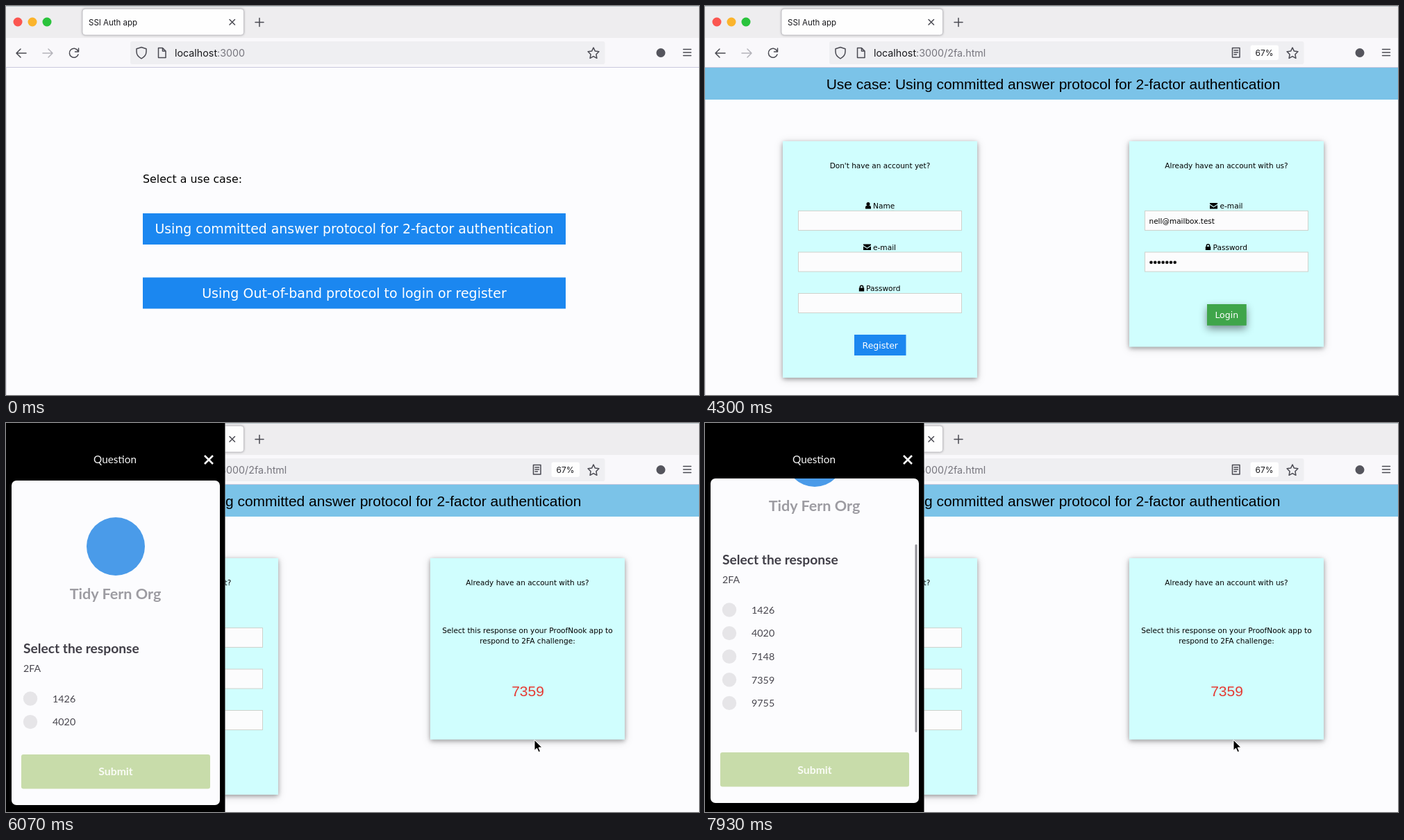
These frames come from a looping animation (998x561 px, 8000 ms). An HTML page:

```html
<!DOCTYPE html>
<html lang="en">
<head>
<meta charset="utf-8">
<style>
html, body { margin: 0; width: 100%; height: 100%; overflow: hidden; background: #fcfcfe; }
svg { display: block; }
text { white-space: pre; }
.ui { font-family: Inter, sans-serif; }
.web { font-family: "DejaVu Sans", sans-serif; }
.head { font-family: "Liberation Sans", sans-serif; }
.app { font-family: Lato, sans-serif; }
.line { fill: none; stroke: #4a4a52; stroke-width: 1.5; stroke-linecap: round; stroke-linejoin: round; }
.card { fill: #d0fefe; filter: drop-shadow(0 2px 3px rgba(0,0,0,.3)) drop-shadow(0 2px 6px rgba(0,0,0,.16)); }
.lift { filter: drop-shadow(0 5px 6px rgba(0,0,0,.45)); }
</style>
</head>
<body>
<svg id="stage" width="998" height="561" viewBox="0 0 998 561"></svg>
<script>
const text = (cls, x, y, size, str, attrs = "") =>
  `<text class="${cls}" x="${x}" y="${y}" font-size="${size}" ${attrs}>${str}</text>`;
const mid = (cls, x, y, size, str, attrs = "") => text(cls, x, y, size, str, `text-anchor="middle" ${attrs}`);
const rect = (x, y, w, h, fill, attrs = "") =>
  `<rect x="${x}" y="${y}" width="${w}" height="${h}" fill="${fill}" ${attrs}/>`;
const circle = (x, y, r, fill, attrs = "") => `<circle cx="${x}" cy="${y}" r="${r}" fill="${fill}" ${attrs}/>`;
const path = (d, attrs = 'class="line"') => `<path d="${d}" ${attrs}/>`;
const group = (id, body, attrs = "") => `<g id="${id}" ${attrs}>${body}</g>`;

const BLUE = "#1b87f0", GREEN = "#3fa54a", PAPER = "#fcfcfd";

const icons = {
  user: "M-4 4.5V2Q-4 0-2 0H2Q4 0 4 2V4.5ZM0-5a2.6 2.6 0 1 1-.01 0Z",
  mail: "M-5.5-4h11v1.6L0 1.2-5.5-2.4ZM-5.5-1 0 2.6 5.5-1V4.5h-11Z",
  lock: "M-3.7-.4h.8v-1.2a2.9 2.9 0 0 1 5.8 0v1.2h.8v4.8h-7.4ZM-1.4-.4h2.8v-1.2a1.4 1.4 0 0 0-2.8 0Z"
};
const label = (x, y, icon, tx, str) =>
  path(icons[icon], `transform="translate(${x} ${y})" fill-rule="evenodd"`) + text("web", tx, y + 4, 10.6, str);
const field = (x, y) => rect(x + .5, y + .5, 235, 28, PAPER, 'stroke="#cfd2cc"');
const ring = (id, y) => rect(633, y, 236.5, 29, "none", `id="${id}" stroke="#2c7be0" stroke-width="1.6" rx="1"`);
const button = (x, y, w, h, fill, size, str) =>
  rect(x, y, w, h, fill) + mid("web", x + w / 2, y + h / 2 + size * .36, size, str, 'fill="#fff"');

const browser =
  rect(0, 0, 998, 561, "#fcfcfe") + rect(0, 0, 998, 46, "#eeedef") + rect(0, 0, 998, 1, "#b9c4c9") +
  rect(0, 46, 998, 42, "#f9f8fb") + rect(0, 88, 998, 1, "#c9c8de") + rect(0, 89, 1, 472, "#dedde6") +
  circle(17, 23, 6.5, "#fb5650") + circle(38, 23, 6.5, "#fbb42c") + circle(59, 23, 6.5, "#2ac33c") +
  rect(110, 4, 232.5, 38, "#fefefe", 'rx="4" stroke="#c4c3c8" style="filter:drop-shadow(0 0 1.5px rgba(0,0,0,.25))"') +
  text("ui", 119, 28, 11.5, "SSI Auth app", 'fill="#18181c"') +
  path("M322 19.5l7.5 7.5M329.500 19.500l-7.500 7.500") + path("M359 23.500h12M365 17.500v12") +
  path("M29 68H15.500M21 62l-6 6 6 6") +
  path("M53 68h13.500M61 62l6 6-6 6", 'class="line" style="stroke:#b4b3ba"') +
  path("M103.500 64.500A6.500 6.500 0 1 0 104 70M104.500 61v5h-5") +
  rect(179, 51, 683.5, 33, "#efeff2", 'rx="3"') +
  path("M195 59.500l7 2.300v4q0 6.500-7 10-7-3.500-7-10v-4Z") +
  path("M219.500 60.500h6l4.500 4.500v9.500h-10.500ZM225.500 60.500v4.500h4.500") +
  path("M846 60l2.400 5.100 5.500.7-4 3.900 1 5.600-4.900-2.700-4.900 2.700 1-5.600-4-3.900 5.500-.7Z") +
  circle(943, 67.5, 6.5, "#55555d") +
  path("M975.500 62.500h11M975.500 67h11M975.500 71.500h11") +
  `<text class="ui" x="243" y="73" font-size="14.3" fill="#18181c">localhost<tspan fill="#77767e">:3000<tspan id="route">/2fa.html</tspan></tspan></text>` +
  group("extras",
    path("M759.500 60.500h10.500v13.500h-10.500ZM762 64h5.500M762 67h5.500M762 70h3.500") +
    rect(785.500, 56.500, 40.500, 21.500, "#fefefe", 'rx="3"') + mid("ui", 805.500, 72, 12, "67%", 'fill="#18181c"'));

const chooser = group("chooser",
  text("web", 197, 254.500, 15.800, "Select a use case:") +
  rect(197, 299, 609, 45, BLUE, 'id="hover" class="lift"') +
  button(197, 299, 609, 45, BLUE, 18.900, "Using committed answer protocol for 2-factor authentication") +
  button(197, 391.500, 609, 45, BLUE, 19, "Using Out-of-band protocol to login or register"));

const forms = group("forms",
  rect(0, 89, 998, 46, "#7bc3e8") +
  mid("head", 501.500, 119.500, 21, "Use case: Using committed answer protocol for 2-factor authentication") +
  rect(112, 195, 280, 341, "", 'class="card"') +
  mid("web", 252, 234, 10.500, "Don't have an account yet?") +
  label(235, 288, "user", 242, "Name") + field(134, 295) +
  label(233.500, 347.500, "mail", 242, "e-mail") + field(134, 354.500) +
  label(225.500, 407, "lock", 232, "Password") + field(134, 414) +
  button(215, 474, 74.500, 30, BLUE, 12.500, "Register") +
  group("login",
    rect(611, 195, 280, 296.500, "", 'class="card"') +
    label(732.500, 288, "mail", 741.500, "e-mail") + field(633, 295) + ring("mailRing", 295) +
    text("web", 639.500, 313.500, 10.500, "nell@mailbox.test", 'id="mail"') +
    label(724.500, 347.500, "lock", 731.500, "Password") + field(633, 354.500) + ring("passRing", 354.500) +
    group("dots", [...Array(7).keys()].map(i => circle(642.500 + i * 5.700, 369.700, 2.300, "#111")).join("")) +
    rect(723, 430, 56.500, 30.500, GREEN, 'id="lift" class="lift"') +
    button(723, 430, 56.500, 30.500, GREEN, 12.500, "Login")) +
  group("challenge",
    rect(611, 195, 280, 261.500, "", 'class="card"') +
    mid("web", 751, 302.500, 10.600, "Select this response on your ProofNook app to") +
    mid("web", 751, 318, 10.600, "respond to 2FA challenge:") +
    mid("head", 751.500, 394, 21, "7359", 'fill="#e53a33"')) +
  mid("web", 751, 234, 10.500, "Already have an account with us?"));

const cursor = path("M0 0v15.300l3.500-3.300 2.500 5.600 2.500-1.100-2.400-5.500h4.800Z",
  'id="cursor" fill="#000" stroke="#fff" stroke-width="1"');

const home =
  rect(0, 0, 316, 561, "#fcfcfe") +
  rect(0, 0, 316, 66, "#fdfdfe", 'style="filter:drop-shadow(0 3px 6px rgba(0,0,0,.13))"') +
  path("M5.500 8.500l6-3.500v7Z", "") + text("ui", 15.500, 12.500, 10.500, "Soft Mart", 'font-weight="500"') +
  [0, 1, 2, 3].map(i => rect(67.500 + i * 3.700, 10 - i * 2, 2.800, 3 + i * 2, "#000")).join("") +
  path("M85.500 7.500q5.500-5 11 0M87.700 10q3.300-3 6.600 0", 'fill="none" stroke="#000" stroke-width="1.900"') +
  circle(91, 11.800, 1.400, "#000") +
  mid("ui", 158, 12.500, 11, "09:41", 'font-weight="600"') + text("ui", 262, 12.500, 10.500, "100%", 'font-weight="500"') +
  rect(291.500, 3.500, 17, 9, "#000", 'rx="2.500"') + rect(309.500, 6.500, 1.300, 3.500, "#000") +
  path("M17 36.500h20M17 42.500h20M17 48.500h20", 'stroke="#6b6a70" stroke-width="2.200"') +
  mid("app", 159, 50, 18.700, "Home", 'fill="#68676d"') +
  circle(158, 150, 33, "none", 'stroke="#ecebf3" stroke-width="6"') +
  path("M144 150l10.500 11 17.500-24", 'fill="none" stroke="#ecebf3" stroke-width="6.500"') +
  mid("app", 157, 248, 14.200, "No new notifications.", 'fill="#a3a2a7"') +
  path("M17 323.500h109.500M189.500 323.500h109", 'stroke="#a5a4a9"') +
  mid("app", 157, 327, 10.700, "Recent", 'fill="#98979c"') +
  circle(30.500, 357, 13, "#a3cdf4") +
  text("app", 51, 355.500, 9, 'You connected with "Tidy Fern Org".', 'fill="#98979c"') +
  text("app", 51, 364.500, 7.500, "Tidy Fern Org", 'fill="#98979c"') +
  text("app", 274, 360, 6, "Just now", 'fill="#98979c" font-style="italic"') +
  circle(277, 523, 22, "#fefefe", 'style="filter:drop-shadow(0 2px 3px rgba(0,0,0,.35))"') +
  path("M269.500 513.500h4l1.500-2.500h4.500l1.500 2.500h4v11.500h-15.500Z") + circle(277.300, 518.800, 2.800, "none", 'class="line"') +
  mid("app", 277, 535, 7.500, "Scan", 'fill="#68676d"');

const options = ["1426", "4020", "7148", "7359", "9755"].map((n, i) => {
  const y = 394.500 + i * 33.600;
  return circle(35, y, 10.200, "#e6e5e8") + text("app", 67, y + 5.200, 14.300, n, 'fill="#47454d"');
}).join("");

const question = group("question",
  rect(0, 0, 316, 561, "#000") +
  mid("app", 157, 57.500, 15.300, "Question", 'fill="#f4f4f4"') +
  path("M286 47l12 12M298 47l-12 12", 'stroke="#fff" stroke-width="2.600"') +
  group("sheet",
    rect(8, 80, 300, 468, "#fcfcfe", 'rx="7"') +
    group("view",
      group("list",
        circle(158, 175, 42, "#4a9be9") +
        mid("app", 157.500, 251.500, 21.600, "Tidy Fern Org", 'font-weight="700" fill="#9d9ca2"') +
        text("app", 25, 329, 19.200, "Select the response", 'font-weight="700" fill="#413f48"') +
        text("app", 25, 356, 14.200, "2FA", 'fill="#47454d"') + options),
      'clip-path="url(#viewClip)"') +
    rect(302.500, 83, 3, 271, "#929197", 'id="thumb" rx="1.500"') +
    rect(22, 475, 272, 49.500, "#c8dcaa", 'rx="3"') +
    mid("app", 158, 505.500, 15.800, "Submit", 'font-weight="700" fill="#fafcf6"')));

document.getElementById("stage").innerHTML =
  `<defs><clipPath id="viewClip"><rect x="8" y="80" width="300" height="369" rx="7"/></clipPath>
   <clipPath id="phoneClip"><rect width="315.500" height="561"/></clipPath></defs>` +
  browser + chooser + forms + cursor + group("phone", home + question, 'clip-path="url(#phoneClip)"');

const $ = id => document.getElementById(id);
const show = (id, on) => $(id).style.display = on ? "" : "none";
const fade = (id, a) => { show(id, a > 0); $(id).setAttribute("opacity", a); };
const move = (id, x, y) => $(id).setAttribute("transform", `translate(${x} ${y})`);
const part = (t, a, b) => Math.min(1, Math.max(0, (t - a) / (b - a)));
const smooth = p => p * p * (3 - 2 * p);
const mix = (a, b, p) => a + (b - a) * p;

const OPEN = 900, ANSWER = 4430, MAX_SCROLL = 125, PEAK = 140.500;

function pointer(t) {
  if (t >= ANSWER) return [761, 457];
  if (t < 1500) {
    const p = smooth(part(t, 30, 830));
    return [mix(640, 520, p), mix(562, 326, p)];
  }
  const p = smooth(part(t, 1500, 2100));
  return [mix(520, 700, p), mix(326, 311, p)];
}

function scroll(t) {
  const out = 1 - (1 - part(t, 6930, 7270)) ** 3;
  return PEAK * out - (PEAK - MAX_SCROLL) * smooth(part(t, 7270, 7730));
}

function draw() {
  const t = performance.now() % 8000;
  show("chooser", t < OPEN);
  show("forms", t >= OPEN);
  show("route", t >= OPEN);
  show("extras", t >= 1000);
  fade("hover", part(t, 500, 700));

  show("mailRing", t >= 2100 && t < 3000);
  show("mail", t >= 2470);
  show("passRing", t >= 3000 && t < 3100);
  show("dots", t >= 3040);
  fade("lift", part(t, 3740, 3870));
  show("login", t < ANSWER);
  show("challenge", t >= ANSWER);

  show("cursor", t > 30 && t < 2470 || t >= ANSWER);
  move("cursor", ...pointer(t));

  fade("phone", part(t, 4870, 5470));
  fade("question", part(t, 5700, 5900));
  move("sheet", 0, t < 6500 ? 481 * Math.exp(-Math.max(0, t - 5700) / 73) : 0);

  const s = scroll(t), inside = Math.min(s, MAX_SCROLL);
  move("list", 0, -s);
  show("thumb", t >= 6930);
  $("thumb").setAttribute("y", 83 + 92 * inside / MAX_SCROLL + s - inside);
  $("thumb").setAttribute("height", 271 - (s - inside));
  requestAnimationFrame(draw);
}
draw();
</script>
</body>
</html>
```
